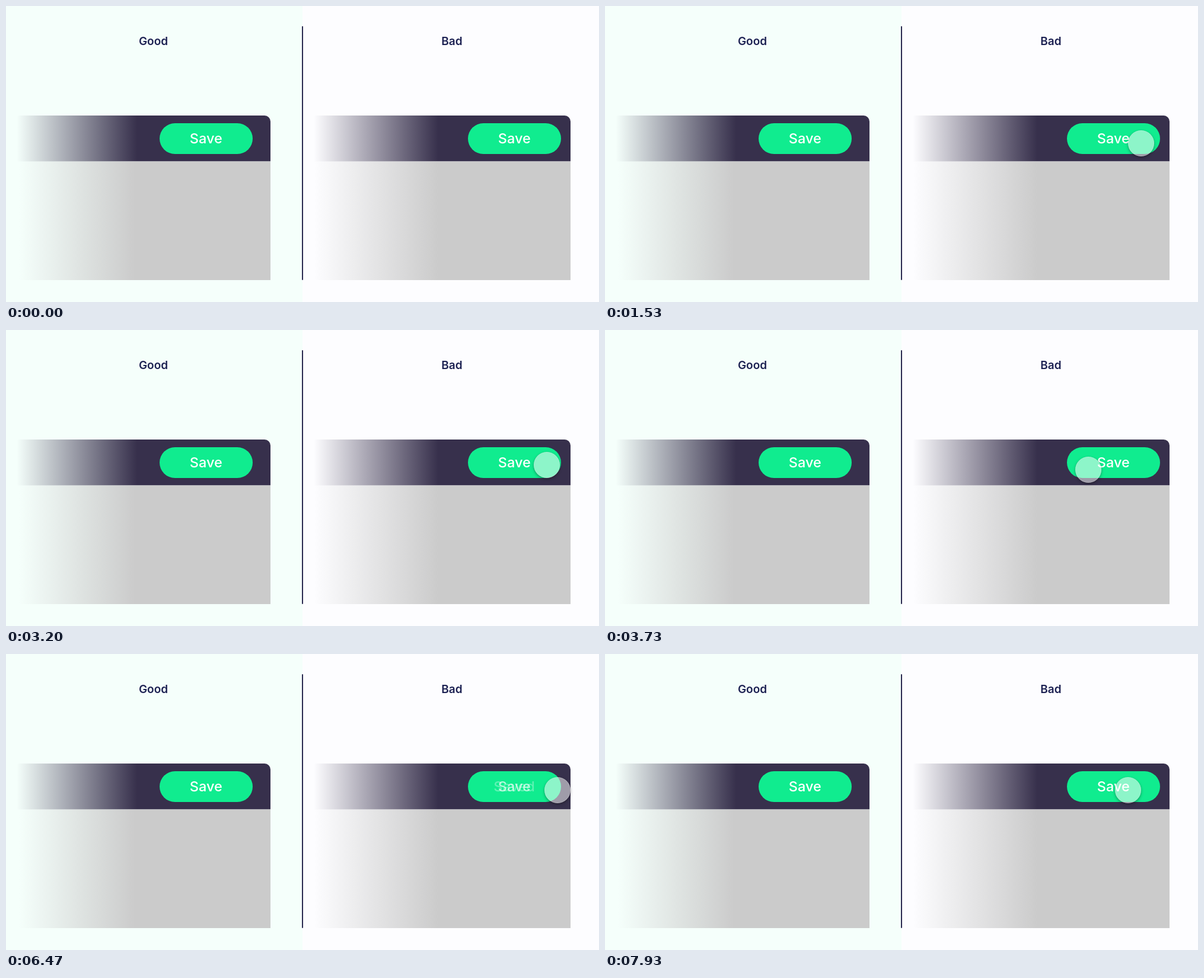
Recreate the animation shown at these times as an HTML page. Size 1000 by 500 pixels, loop 8 s.

```html
<!DOCTYPE html>
<html lang="en">
<head>
<meta charset="utf-8">
<title>Good and bad save button</title>
<style>
  html, body { margin: 0; width: 100%; height: 100%; overflow: hidden; background: #fdfdff; }
  svg { display: block; width: 100%; height: 100%; }
  text { font-family: Inter, "Open Sans", sans-serif; text-anchor: middle; }
  .title { font-size: 19px; font-weight: 600; fill: #1c2152; }
  .label { font-size: 23.5px; font-weight: 500; fill: #fff; }
  #cursor { filter: drop-shadow(0 2px 2.5px rgba(0, 0, 0, .4)); }
</style>
</head>
<body>
<svg viewBox="0 0 1000 500">
  <defs>
    <linearGradient id="barL" gradientUnits="userSpaceOnUse" x1="18" x2="221">
      <stop stop-color="#37304c" stop-opacity="0"/><stop offset="1" stop-color="#37304c"/>
    </linearGradient>
    <linearGradient id="barR" href="#barL" x1="519" x2="729"/>
    <linearGradient id="bodyL" gradientUnits="userSpaceOnUse" x1="22" x2="217">
      <stop stop-color="#cbcbcb" stop-opacity="0"/><stop offset="1" stop-color="#cbcbcb"/>
    </linearGradient>
    <linearGradient id="bodyR" href="#bodyL" x1="519" x2="729"/>
  </defs>

  <rect width="500" height="500" fill="#f5fffb"/>
  <rect x="499" y="34" width="2" height="429" rx="1" fill="#2b2a50"/>
  <text class="title" x="248.5" y="65.5">Good</text>
  <text class="title" x="752" y="65.5">Bad</text>

  <path d="M18 185H436a10 10 0 0 1 10 10V262.5H18z" fill="url(#barL)"/>
  <path d="M18 262.5H446V463H18z" fill="url(#bodyL)"/>
  <rect x="259" y="198" width="157" height="52" rx="26" fill="#10ec8f"/>
  <text class="label" x="337.3" y="232.3">Save</text>

  <path d="M519 185H942a10 10 0 0 1 10 10V262.5H519z" fill="url(#barR)"/>
  <path d="M519 262.5H952V463H519z" fill="url(#bodyR)"/>
  <rect x="779" y="198" width="157" height="52" rx="26" fill="#10ec8f"/>
  <text class="label" id="save" x="857.3" y="232.3">Save</text>
  <text class="label" id="saved" x="857" y="232.3">Saved</text>

  <!-- the shadow lies only outside the translucent disc -->
  <mask id="ring" maskUnits="userSpaceOnUse" x="-40" y="-40" width="80" height="80">
    <rect x="-40" y="-40" width="80" height="80" fill="#fff"/><circle r="21.7"/>
  </mask>
  <g id="pointer">
    <g mask="url(#ring)"><circle id="cursor" r="21.5" fill="#777"/></g>
    <circle r="22" fill="#fff" fill-opacity=".52"/>
    <circle r="21.6" fill="none" stroke="#fff" stroke-opacity=".25" stroke-width=".8"/>
  </g>
</svg>
<script>
const LOOP = 8000, STEP = 1000 / 15;

// pointer path: time, x, y
const path = [
  [267, 792, -30], [333, 787, -17], [600, 698, 45], [867, 651, 130], [1133, 741, 206],
  [1333, 840, 222], [1533, 904, 232], [1733, 916, 232], [2000, 907, 226], [2200, 912, 228],
  [2600, 912, 228], [2667, 908, 223], [2733, 911, 226], [2800, 911, 226], [2867, 912, 228],
  [3200, 912, 228], [3400, 870, 218], [3600, 806, 222], [3667, 800, 230], [3733, 815, 236],
  [3867, 862, 247], [4000, 905, 246], [4133, 922, 236], [4267, 924, 229], [4600, 924, 229],
  [4800, 932, 219], [4933, 937, 214.5], [5067, 930, 222], [5333, 930, 222], [5667, 930, 230],
  [7333, 930, 230], [7533, 885, 195], [7667, 815, 200], [7733, 800, 218], [7800, 813, 239],
  [7867, 845, 244], [7933, 882, 230]
];
const last = path.length - 1;
const el = id => document.getElementById(id);
const clamp = v => Math.min(1, Math.max(0, v));
const easeOut = (t, from, to) => 1 - (1 - clamp((t - from) / (to - from))) ** 4;

// slope at key i, flat at turning points so that the curve never overshoots
function slope(i, axis) {
  if (i === 0 || i === last) {
    i = Math.max(1, i);
    return (path[i][axis] - path[i - 1][axis]) / (path[i][0] - path[i - 1][0]);
  }
  const [a, b] = [i, i + 1].map(k =>
    (path[k][axis] - path[k - 1][axis]) / (path[k][0] - path[k - 1][0]));
  return a * b <= 0 ? 0 : 2 * a * b / (a + b);
}

function along(t, axis) {
  let i = 0;
  while (i < last - 1 && path[i + 1][0] <= t) i++;
  const p = path[i], q = path[i + 1], d = q[0] - p[0], u = clamp((t - p[0]) / d);
  const s = u * u * (3 - 2 * u);
  return p[axis] * (1 - s) + q[axis] * s
    + d * u * (1 - u) * ((1 - u) * slope(i, axis) - u * slope(i + 1, axis));
}

function draw(now) {
  const t = Math.floor((now % LOOP + 5) / STEP) * STEP;
  el("pointer").setAttribute("transform", `translate(${along(t, 1)} ${along(t, 2)})`);
  el("pointer").setAttribute("visibility", t < 330 ? "hidden" : "visible");
  const done = easeOut(t, 5333, 5670) - easeOut(t, 6400, 6670);
  el("save").setAttribute("opacity", 1 - done);
  el("saved").setAttribute("opacity", done);
}

const start = performance.now();
function tick() {
  draw(performance.now() - start);
  requestAnimationFrame(tick);
}
tick();
</script>
</body>
</html>
```
